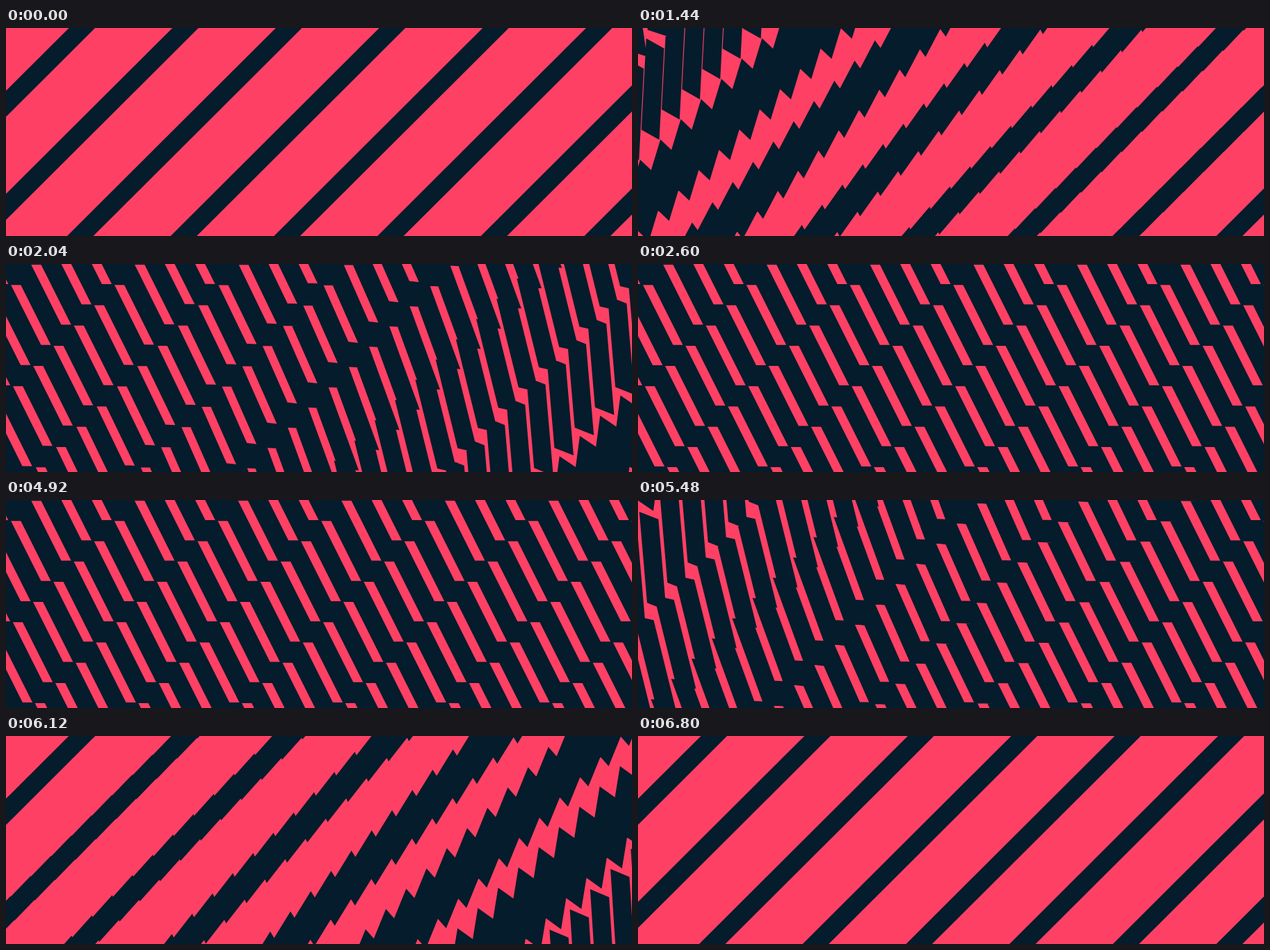
Recreate the animation shown at these times as an HTML page with a canvas. Size 900 by 300 pixels, loop 7240 ms.

```html
<!DOCTYPE html>
<html lang="en">
<head>
<meta charset="utf-8">
<title>Turning stripes</title>
<style>
  html, body { margin: 0; width: 100%; height: 100%; overflow: hidden; background: #ff4065; }
  canvas { display: block; }
</style>
</head>
<body>
<canvas id="stage" width="900" height="300"></canvas>
<script>
const ctx = document.getElementById('stage').getContext('2d');

const LOOP = 7240, TICK = 40;
const OUT = 750, BACK = 4930, TURN = 1300, STAGGER = 90;

const STRIPE = 148.7;   // distance between stripes along x
const FIRST = 109.3;    // x + y on the centre line of stripe 0
const STEP = 29.2;      // distance between slabs on a stripe, in x and y
const WIDE = 29.6, TALL = 118;
const TILT = Math.PI * 0.75 - Math.atan(2);

// Slab at rest: a parallelogram leaning one across for two down
const slab = [
  [-WIDE / 2 - TALL / 4, -TALL / 2],
  [WIDE / 2 - TALL / 4, -TALL / 2],
  [WIDE / 2 + TALL / 4, TALL / 2],
  [-WIDE / 2 + TALL / 4, TALL / 2]
];

function ease(x) {
  x = Math.min(1, Math.max(0, x));
  return x < 0.5 ? 4 * x ** 3 : 1 - 4 * (1 - x) ** 3;
}

function angle(time, stripe) {
  const t = time - stripe * STAGGER;
  return TILT * (1 - ease((t - OUT) / TURN) + ease((t - BACK) / TURN));
}

function addStripe(stripe, turn) {
  const c = Math.cos(turn), s = Math.sin(turn);
  const corners = slab.map(([x, y]) => [x * c - y * s, x * s + y * c]);
  for (let row = -4; row <= 14; row++) {
    const cy = 0.5 + row * STEP;
    const cx = FIRST + stripe * STRIPE - cy;
    corners.forEach(([x, y], i) => {
      if (i) ctx.lineTo(cx + x, cy + y);
      else ctx.moveTo(cx + x, cy + y);
    });
    ctx.closePath();
  }
}

function draw(time) {
  ctx.fillStyle = '#ff4065';
  ctx.fillRect(0, 0, 900, 300);
  ctx.fillStyle = '#041c2b';
  ctx.beginPath();
  for (let i = -2; i <= 8; i++) addStripe(i, angle(time, i));
  ctx.fill();
}

const start = performance.now();

function frame() {
  const t = (performance.now() - start) % LOOP;
  draw(Math.floor(t / TICK) * TICK);
  requestAnimationFrame(frame);
}
frame();
</script>
</body>
</html>
```
